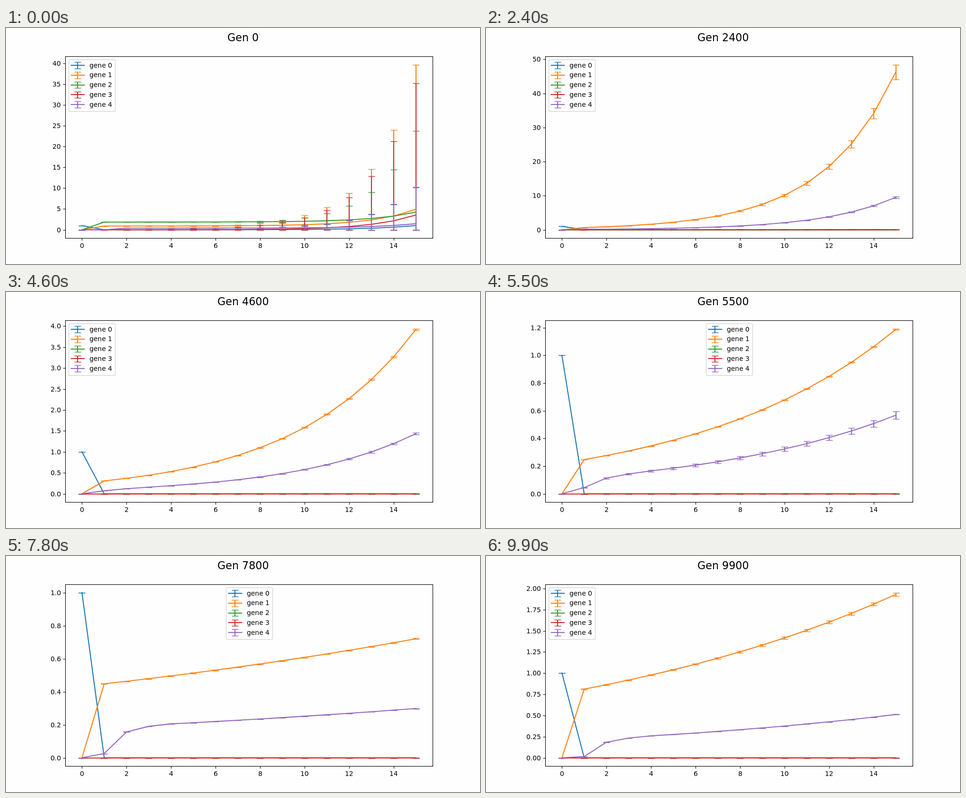
Recreate the animation shown at these times as an HTML page with a canvas. Size 1000 by 500 pixels, loop 10000 ms.

```html
<!DOCTYPE html>
<html lang="en">
<head>
<meta charset="utf-8">
<title>Gene expression by generation</title>
<style>
html, body { margin: 0; width: 100%; height: 100%; overflow: hidden; background: #fefefe; }
canvas { display: block; width: 100%; height: 100%; }
</style>
</head>
<body>
<canvas id="stage" width="1000" height="500"></canvas>
<script>
const ctx = document.getElementById('stage').getContext('2d');
const COLORS = ['#1f77b4', '#ff7f0e', '#2ca02c', '#d62728', '#9467bd'];
const AXES = { left: 125, top: 60, right: 900, bottom: 445 };
const X0 = 160.227, DX = 46.97, Y0 = 427.5, SPAN = 350;
const LINE = 2.083, THIN = 1.389, HAIR = 1.111, EM = 13.889;
const STEP_MS = 100, STEPS = 100, SETTLED = 14;

// Key points of the two lasting genes, 1 and 4; values between them move geometrically.
const KEYS = [
  { step: 0, growth: 1.655, errGrowth: 1.655, end: [4, 1.05], err: [35.7, 9.23] },
  { step: 14, growth: 1.403, errGrowth: 1.62, end: [116, 19], err: [26.5, 3.5] },
  { step: 35, growth: 1.306, errGrowth: 1.2, end: [16.85, 4.45], err: [0.14, 0.02] },
  { step: 55, growth: 1.1188, errGrowth: 1.12, end: [1.189, 0.568], err: [0.005, 0.0268] },
  { step: 69, growth: 1.0293, errGrowth: 1.03, end: [0.62, 0.272], err: [0.001, 0.001] },
  { step: 77, growth: 1.033, errGrowth: 1.03, end: [0.66, 0.295], err: [0.002, 0.001] },
  { step: 87, growth: 1.0488, errGrowth: 1.048, end: [1.583, 0.33], err: [0.0735, 0.013] },
  { step: 99, growth: 1.0639, errGrowth: 1.13, end: [1.932, 0.512], err: [0.021, 0.004] }
];

const mix = (a, b, p) => a + (b - a) * p;
const geo = (a, b, p) => a * (b / a) ** p;
const snap = v => Math.floor(v + 0.5);
const xAt = i => X0 + DX * i;

function keyed(step) {
  const i = KEYS.findLastIndex((k, j) => k.step <= step && j < KEYS.length - 1);
  const a = KEYS[i], b = KEYS[i + 1];
  const p = (step - a.step) / (b.step - a.step);
  const pair = name => a[name].map((v, j) => geo(v, b[name][j], p));
  return {
    growth: geo(a.growth, b.growth, p),
    errGrowth: geo(a.errGrowth, b.errGrowth, p),
    end: pair('end'),
    err: pair('err')
  };
}

function makeAllSeries(step) {
  const { growth, errGrowth, end, err } = keyed(step);
  const rise = Math.min(1, step / SETTLED);
  const fade = Math.exp(-step);
  const drop = Math.exp(-0.75 * Math.max(0, step - SETTLED));

  // Genes 0, 2 and 3 are shares of gene 1 that die out.
  const share = late => [0.255 * fade, 1, 0.595 * fade, mix(0.888, late, rise) * drop];
  const ends = [...share(1.19).map(s => s * end[0]), end[1]];
  const errs = [...share(1).map(s => s * err[0]), err[1]];
  const offsets = [0, 0.9, 1.85, 0, 0.4].map(v => v * (1 - rise));

  // Genes 3 and 4 react late, so their first values lag behind the curve.
  const lag1 = Math.min(1.6, 0.38 * (55 / step) ** 2.9);
  const lag2 = 0.8 + 0.2 * Math.exp(-Math.max(0, step - 35) / 17);

  return COLORS.map((_, gene) => {
    const late = gene > 2;
    const [d1, d2] = gene === 3 ? [0, 0.3] : gene === 4 ? [lag1, lag2] : [1, 1];
    const damp = [0, d1, d2, 1 - 0.22 * (1 - d2)];
    return Array.from({ length: 16 }, (_, x) => {
      if (x === 0) { const y = gene === 0 ? 1 : 0; return { y, lo: y, hi: y }; }
      const k = damp[x] ?? 1;
      const base = late && x === 1 ? 0 : offsets[gene];
      const y = base + k * ends[gene] * growth ** (x - 15);
      const raw = k * errs[gene] * errGrowth ** (x - 15);
      const e = raw * raw / (raw + offsets[gene] || 1);
      return { y, lo: Math.max(0, y - e), hi: y + e };
    });
  });
}

function stroke(points, color, width, cap = 'butt') {
  ctx.beginPath();
  points.forEach(([x, y]) => ctx.lineTo(x, y));
  ctx.strokeStyle = color;
  ctx.lineWidth = width;
  ctx.lineCap = cap;
  ctx.lineJoin = 'round';
  ctx.stroke();
}

// Text starts on a whole pixel; align is the part of its width left of x.
function text(str, x, y, align = 0, size = EM) {
  ctx.font = `${size}px "DejaVu Sans", sans-serif`;
  ctx.fillStyle = '#000';
  ctx.fillText(str, Math.round(x - align * ctx.measureText(str).width), y);
}

function cap(x, y, color) {
  const cx = snap(x), cy = snap(y) + 0.5;
  stroke([[cx - 6.5, cy], [cx + 7.5, cy]], color, THIN);
}

function errorBar(x, lo, hi, color) {
  if (snap(lo) !== snap(hi)) stroke([[snap(x), snap(lo)], [snap(x), snap(hi)]], color, LINE);
}

function drawSeries(series, color, scale) {
  const yAt = v => Y0 - v * scale;
  const flat = series.every(p => p.y * scale < 0.02);
  stroke(series.map((p, i) => [xAt(i), flat ? snap(Y0) : yAt(p.y)]), color, LINE, 'square');
  series.forEach((p, i) => errorBar(xAt(i), yAt(p.lo), yAt(p.hi), color));
  series.forEach((p, i) => {
    cap(xAt(i), yAt(p.lo), color);
    cap(xAt(i), yAt(p.hi), color);
  });
}

function tickStep(max) {
  const raw = max * 1.1 / 9;
  const base = 10 ** Math.floor(Math.log10(raw));
  const step = base * [1, 2, 2.5, 5, 10].find(s => s * base >= raw * 0.99999);
  let digits = 0;
  while (Math.abs(step - step.toFixed(digits)) > 1e-6) digits++;
  return { step, digits };
}

function drawAxes(max, scale) {
  const { left, top, right, bottom } = AXES;
  for (let i = 0; i <= 14; i += 2) {
    const x = snap(xAt(i)) + 0.5;
    stroke([[x, bottom + 0.5], [x, bottom + 5.5]], '#000', HAIR);
    text(String(i), xAt(i), 466, 0.5);
  }
  const { step, digits } = tickStep(max);
  for (let v = 0; v <= max * 1.05; v += step) {
    const y = snap(Y0 - v * scale + 1e-6);
    stroke([[left - 4.5, y + 0.5], [left + 0.5, y + 0.5]], '#000', HAIR);
    text(v.toFixed(digits), 115.75, y + 5, 1);
  }
  ctx.strokeStyle = '#000';
  ctx.lineWidth = HAIR;
  ctx.lineJoin = 'miter';
  ctx.strokeRect(left + 0.5, top + 0.5, right - left, bottom - top);
}

// Picks the free corner, or the middle when both corners are crossed.
function legendLeft(scale, tallest) {
  const limit = Y0 - 177;
  if (tallest * scale < limit) return 795.6;
  return scale < limit ? 132 : 464;
}

function drawLegend(left) {
  ctx.beginPath();
  ctx.roundRect(Math.floor(left) + 0.5, 67.2, 98, 109.6, 2.8);
  ctx.fillStyle = 'rgba(255,255,255,0.8)';
  ctx.fill();
  ctx.strokeStyle = 'rgba(204,204,204,0.8)';
  ctx.lineWidth = THIN;
  ctx.stroke();
  COLORS.forEach((color, i) => {
    const y = 78.67 + 20.93 * i, mid = left + 19.45, arm = EM / 2;
    stroke([[left + 5.5, snap(y)], [left + 33.3, snap(y)]], color, LINE, 'square');
    errorBar(mid, y - arm, y + arm, color);
    cap(mid, y - arm, color);
    cap(mid, y + arm, color);
    text('gene ' + i, left + 44, Math.floor(84.05 + 20.75 * i));
  });
}

function draw(step) {
  ctx.fillStyle = '#fefefe';
  ctx.fillRect(0, 0, 1000, 500);
  const all = makeAllSeries(step);
  const max = Math.max(...all.flat().map(p => p.hi));
  const tallest = Math.max(...all.map(s => s[15].hi));
  const scale = SPAN / max;
  all.forEach((s, gene) => drawSeries(s, COLORS[gene], scale));
  drawAxes(max, scale);
  drawLegend(legendLeft(scale, tallest));
  text('Gen ' + step * 100, 500, 28, 0.5, 22.222);
}

let shown = -1;
function tick() {
  const step = Math.floor(performance.now() / STEP_MS) % STEPS;
  if (step !== shown) draw(shown = step);
  requestAnimationFrame(tick);
}
tick();
</script>
</body>
</html>
```
